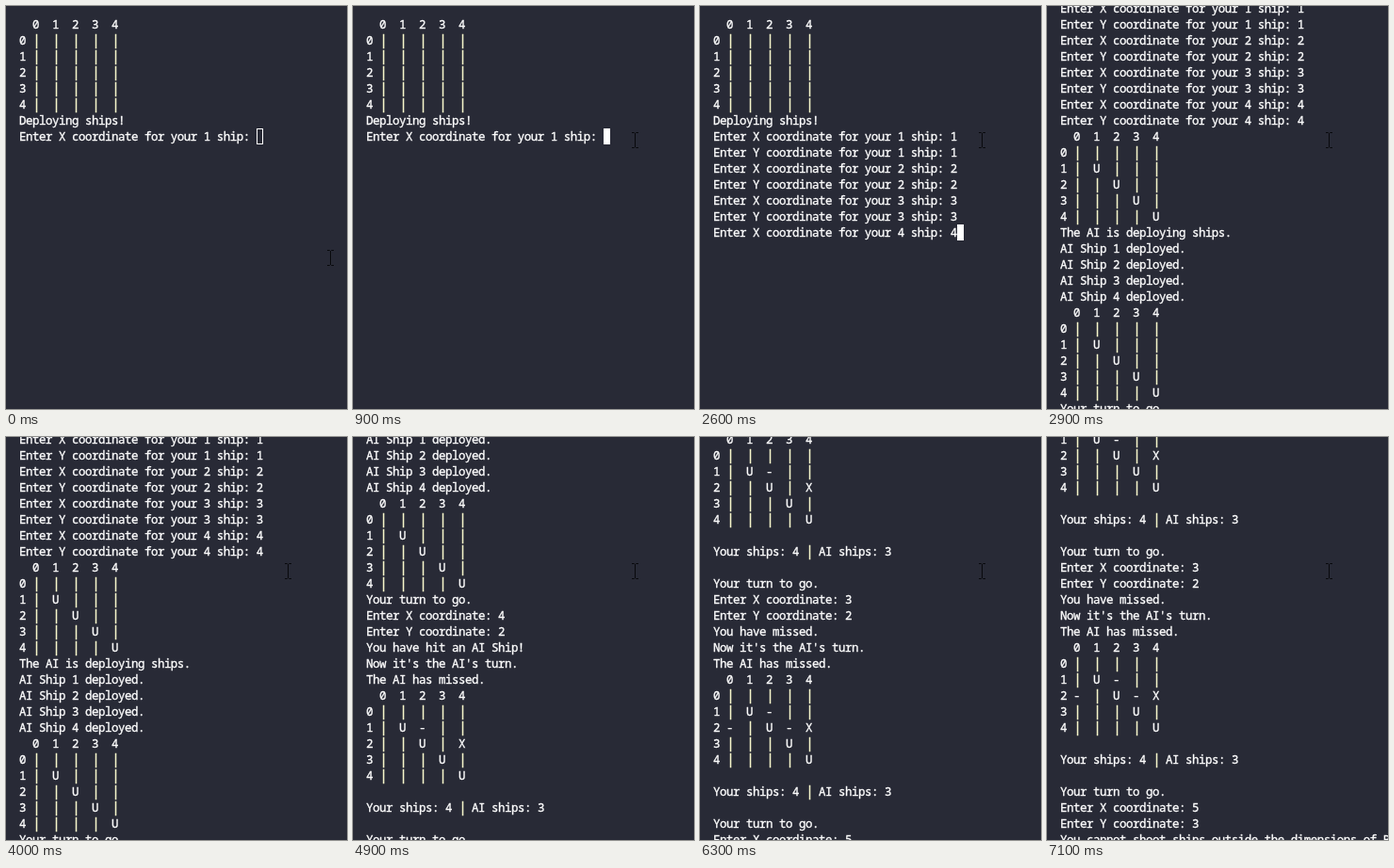
Animation of 362 by 428 pixels, one loop 7200 ms. Source, as an HTML page:

```html
<!DOCTYPE html>
<html lang="en">
<head>
<meta charset="utf-8">
<title>Ship game in a terminal</title>
<style>
  html, body { margin: 0; width: 100%; height: 100%; overflow: hidden; background: #282a36; }
  #stage { position: relative; width: 362px; height: 428px; overflow: hidden; }
  pre, #caret, #mouse { position: absolute; }
  pre {
    margin: 0; left: 14px; color: #fff;
    font: 12.4px/17px "Noto Sans Mono", "DejaVu Sans Mono", monospace;
    font-variant-ligatures: none;
    -webkit-text-stroke: .35px;
  }
  pre, pre i { letter-spacing: calc(7px - .6em); }
  pre i { font-style: normal; font-size: 15px; line-height: 0; color: #f6f6cc; }
  #caret { width: 7px; height: 17px; box-sizing: border-box; border: 1px solid #fff; }
  #mouse { left: 0; top: 0; }
</style>
</head>
<body>
<div id="stage">
  <pre id="log"></pre>
  <div id="caret"></div>
  <svg id="mouse" width="9" height="17" fill="none" stroke="#08090c">
    <path d="M1 .5H3.5L4.5 1.5L5.5 .5H8M4.5 1V16M1 16.5H3.5L4.5 15.5L5.5 16.5H8"/>
  </svg>
</div>
<script>
const LOOP = 7200, STEP = 100, ROWS = 26, LINE = 17, CHAR = 7, LEFT = 14, TOP = 11;
const [log, caret, mouse] = ["log", "caret", "mouse"].map(id => document.getElementById(id));
const digits = [0, 1, 2, 3, 4];

// Cells are keyed by row then column, e.g. "24" is row 2, column 4.
const board = cells => "  " + digits.join("  ") + "\n" +
  digits.map(r => r + " " + digits.map(c => cells["" + r + c] || "|").join("  ") + "\n").join("");
const askShip = (axis, n) => `Enter ${axis} coordinate for your ${n} ship: `;
const ask = axis => `Enter ${axis} coordinate: `;
const turn = "Your turn to go.\n" + ask("X");
const round = (result, cells) =>
  `${result}\nNow it's the AI's turn.\nThe AI has missed.\n${board(cells)}\nYour ships: 4 | AI ships: 3\n\n${turn}`;

const fleet = { 11: "U", 22: "U", 33: "U", 44: "U" };
const first = { ...fleet, 12: "-", 24: "X" };
const second = { ...first, 20: "-", 23: "-" };
const deployed = [1, 2, 3, 4].map(n => `AI Ship ${n} deployed.\n`).join("");

// What is added to the terminal, and when.
const script = [
  [0, board({}) + "Deploying ships!\n" + askShip("X", 1)],
  [1000, "1"], [1200, "\n" + askShip("Y", 1)],
  [1300, "1"], [1500, "\n" + askShip("X", 2)],
  [1600, "2"], [1700, "\n" + askShip("Y", 2)],
  [1900, "2"], [2000, "\n" + askShip("X", 3)],
  [2100, "3"], [2200, "\n" + askShip("Y", 3)],
  [2300, "3"], [2500, "\n" + askShip("X", 4)],
  [2600, "4"], [2700, "\n" + askShip("Y", 4)],
  [2800, "4"],
  [2900, "\n" + board(fleet) + "The AI is deploying ships.\n" + deployed + board(fleet) + turn],
  [4700, "4\n" + ask("Y")],
  [4900, "2\n" + round("You have hit an AI Ship!", first)],
  [5300, "3\n" + ask("Y")],
  [5600, "2\n" + round("You have missed.", second)],
  [6200, "5\n" + ask("Y")],
  [6700, "3\nYou cannot shoot ships outside the dimensions of Board.\n" + ask("X")],
];

let shown = "";
function draw(t) {
  const text = script.filter(([at]) => at <= t).map(([, s]) => s).join("");
  const lines = text.split("\n");
  const scroll = Math.max(0, lines.length - ROWS);
  if (text !== shown) {
    log.innerHTML = text.replace(/\|/g, "<i>|</i>");
    shown = text;
  }
  log.style.top = TOP - scroll * LINE + "px";

  caret.style.left = LEFT + lines.at(-1).length * CHAR + "px";
  caret.style.top = TOP + (lines.length - 1 - scroll) * LINE + "px";
  caret.style.background = t < 900 ? "none" : "#fff";

  const p = Math.min(1, t / 800), e = p * p * (3 - 2 * p);
  mouse.style.transform = `translate(${Math.round(340 - 45 * e)}px, ${Math.round(259 - 125 * e)}px)`;
}

const start = performance.now();
function tick() {
  const t = (performance.now() - start) % LOOP;
  draw(Math.floor(t / STEP) * STEP);
  requestAnimationFrame(tick);
}
tick();
</script>
</body>
</html>
```
